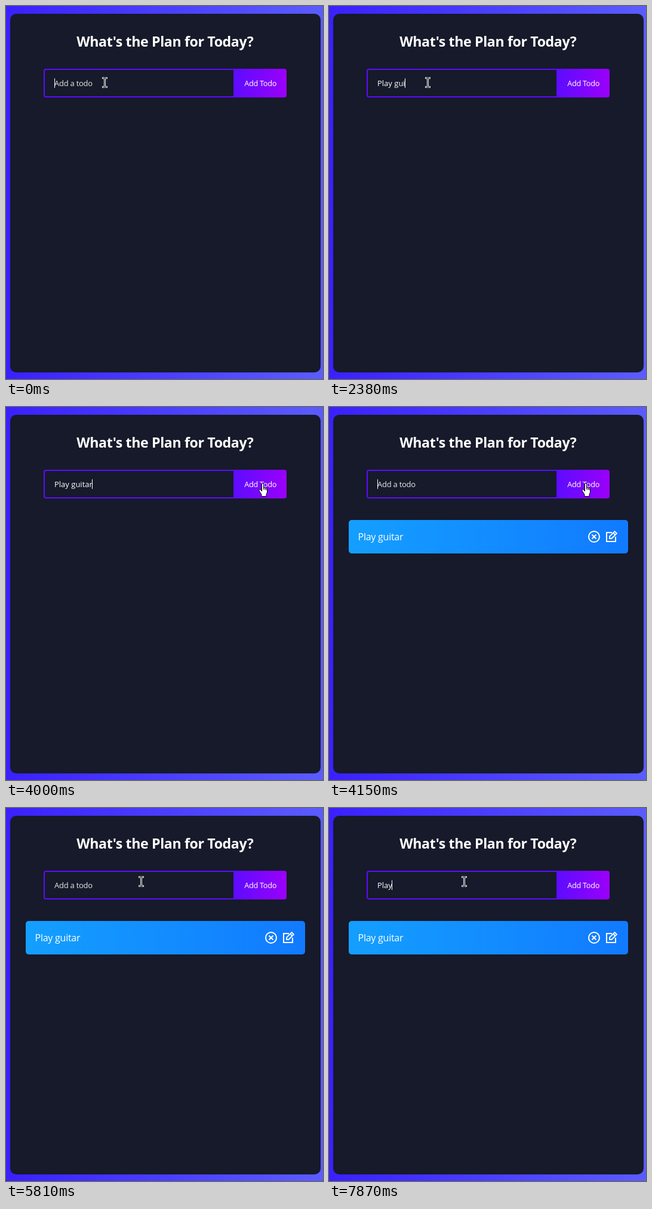
Recreate the animation shown at these times as an HTML page. Size 531 px wide and 624 px high, loop 8 s.

```html
<!DOCTYPE html>
<html lang="en">
<head>
<meta charset="utf-8">
<title>Todo list</title>
<style>
  html, body { margin: 0; width: 100%; height: 100%; overflow: hidden; }
  svg { display: block; width: 531px; height: 624px; }
  text { font-family: "Open Sans", "Noto Sans", sans-serif; font-weight: 500; fill: #fff; white-space: pre; }
  .title { font-size: 23.2px; font-weight: 700; letter-spacing: -.4px; text-anchor: middle; }
  .field { font-size: 13px; }
  .hint { fill: #e8e8ea; letter-spacing: -.25px; }
  .label { font-size: 12.8px; letter-spacing: -.35px; }
  .item { font-size: 16px; letter-spacing: -.25px; }
  .icon { fill: none; stroke: #fff; stroke-width: 2; }
  #row { animation: appear 8s step-end infinite; }
  @keyframes appear { 0% { visibility: hidden; } 51.875% { visibility: visible; } }
</style>
</head>
<body>
<svg viewBox="0 0 531 624">
  <defs>
    <linearGradient id="page"><stop stop-color="#3a20ff"/><stop offset="1" stop-color="#5b5cff"/></linearGradient>
    <linearGradient id="violet"><stop stop-color="#5d0cff"/><stop offset="1" stop-color="#9b00fa"/></linearGradient>
    <linearGradient id="blue"><stop stop-color="#149fff"/><stop offset="1" stop-color="#117aff"/></linearGradient>
  </defs>

  <rect width="531" height="624" fill="url(#page)"/>
  <rect x="7" y="13" width="520" height="600" rx="10" fill="#161a2a"/>
  <text class="title" x="266.3" y="68">What's the Plan for Today?</text>

  <path d="M383 106H67a3 3 0 0 0-3 3v40a3 3 0 0 0 3 3h316M382 106v46" fill="none" stroke="#5d0cff" stroke-width="2"/>
  <path d="M383 105h83a4 4 0 0 1 4 4v40a4 4 0 0 1-4 4h-83z" fill="url(#violet)"/>
  <text class="label" x="399.3" y="134">Add Todo</text>
  <text class="field hint" id="hint" x="81" y="134">Add a todo</text>
  <text class="field" id="typed" x="81" y="134"></text>
  <rect id="caret" y="121" width="1" height="16" fill="#fff"/>

  <g id="row">
    <rect x="33" y="189" width="468" height="56" rx="5" fill="url(#blue)"/>
    <text class="item" x="48.5" y="223">Play guitar</text>
    <g class="icon">
      <circle cx="444" cy="217" r="9"/>
      <path d="M440.5 213.5l7 7M447.5 213.5l-7 7"/>
      <path d="M474 210h-9v15h15v-8"/>
      <path d="M470 220v-3.5l8.5-8.5 3.5 3.5-8.5 8.5zM476 210.5l3.5 3.5" stroke-width="1.8"/>
    </g>
  </g>

  <path id="beam" d="M-4-8.5h3l1 1 1-1h3v2h-3v13h3v2h-3l-1-1-1 1h-3v-2h3v-13h-3z" fill="#0b0c14" stroke="#fff"/>
  <g id="hand" stroke="#000">
    <path d="M-1.5 3V-9a1.5 1.5 0 0 1 3 0v6a1.2 1.2 0 0 1 2.2.5a1.1 1.1 0 0 1 2 .7a1 1 0 0 1 1.8.8v5.500l-1.500 4v3h-8v-3l-4-6.500a1.500 1.500 0 0 1 2.300-1.800z" fill="#fff"/>
    <path d="M1.500-3v3M3.700-2.500v3M5.700-1.800v3" fill="none"/>
  </g>
</svg>
<script>
  const LOOP = 8000, KEY_GAP = 150, BLINK = 520, BLINK_DELAY = 70;
  const SUBMIT = 4150, BUTTON_X = 383, FIELD_X = 81;
  const $ = id => document.getElementById(id);
  const show = (el, on) => el.setAttribute('visibility', on ? 'visible' : 'hidden');
  const ease = p => p * p * (3 - 2 * p);

  // Bursts of keys, one letter per gap
  const burst = (start, letters, gap = KEY_GAP) =>
    [...letters].map((letter, i) => ({ time: start + i * gap, letter }));
  const keys = [
    ...burst(900, 'Play'), ...burst(1640, ' '), ...burst(2100, 'gui', 140), ...burst(2680, 'tar'),
    ...burst(7270, 'P'), ...burst(7570, 'la', 0), ...burst(7870, 'y')
  ];

  // Keys, presses and focus restart the caret's blinking
  const restarts = [-130, 4000, SUBMIT, 5200, ...keys.map(k => k.time)];

  // Mouse glides, each seen in three steps
  const home = { x: 165.5, y: 128 };
  const glides = [
    { start: 3570, span: 430, x: 430, y: 138 },
    { start: 4300, span: 450, x: 226.5, y: 123 },
    { start: 5050, span: 1, x: 232.5, y: 123 },
    { start: 5200, span: 1, x: 226.5, y: 123 }
  ];

  function typedAt(t) {
    const from = t < SUBMIT ? 0 : SUBMIT;
    return keys.filter(k => k.time >= from && k.time <= t).map(k => k.letter).join('');
  }

  function caretOn(t) {
    const idle = t - Math.max(...restarts.filter(r => r <= t));
    return Math.floor((idle - BLINK_DELAY) / BLINK) % 2 === 0 || idle < BLINK_DELAY;
  }

  function mouseAt(t) {
    return glides.filter(g => g.start <= t).reduce((pos, g) => {
      const p = ease(Math.min(1, Math.floor(3 * (t - g.start) / g.span) / 3));
      return { x: pos.x + (g.x - pos.x) * p, y: pos.y + (g.y - pos.y) * p };
    }, home);
  }

  function draw(t) {
    const text = typedAt(t), typed = $('typed');
    typed.textContent = text;
    show($('hint'), !text);
    const width = text ? typed.getComputedTextLength() : 0;
    $('caret').setAttribute('x', Math.floor(FIELD_X + width));
    show($('caret'), caretOn(t));

    const { x, y } = mouseAt(t);
    for (const id of ['beam', 'hand']) {
      $(id).setAttribute('transform', `translate(${x} ${y})`);
      show($(id), (id === 'hand') === x > BUTTON_X);
    }
  }

  const start = performance.now();
  function tick() {
    draw((performance.now() - start) % LOOP);
    requestAnimationFrame(tick);
  }
  tick();
</script>
</body>
</html>
```
